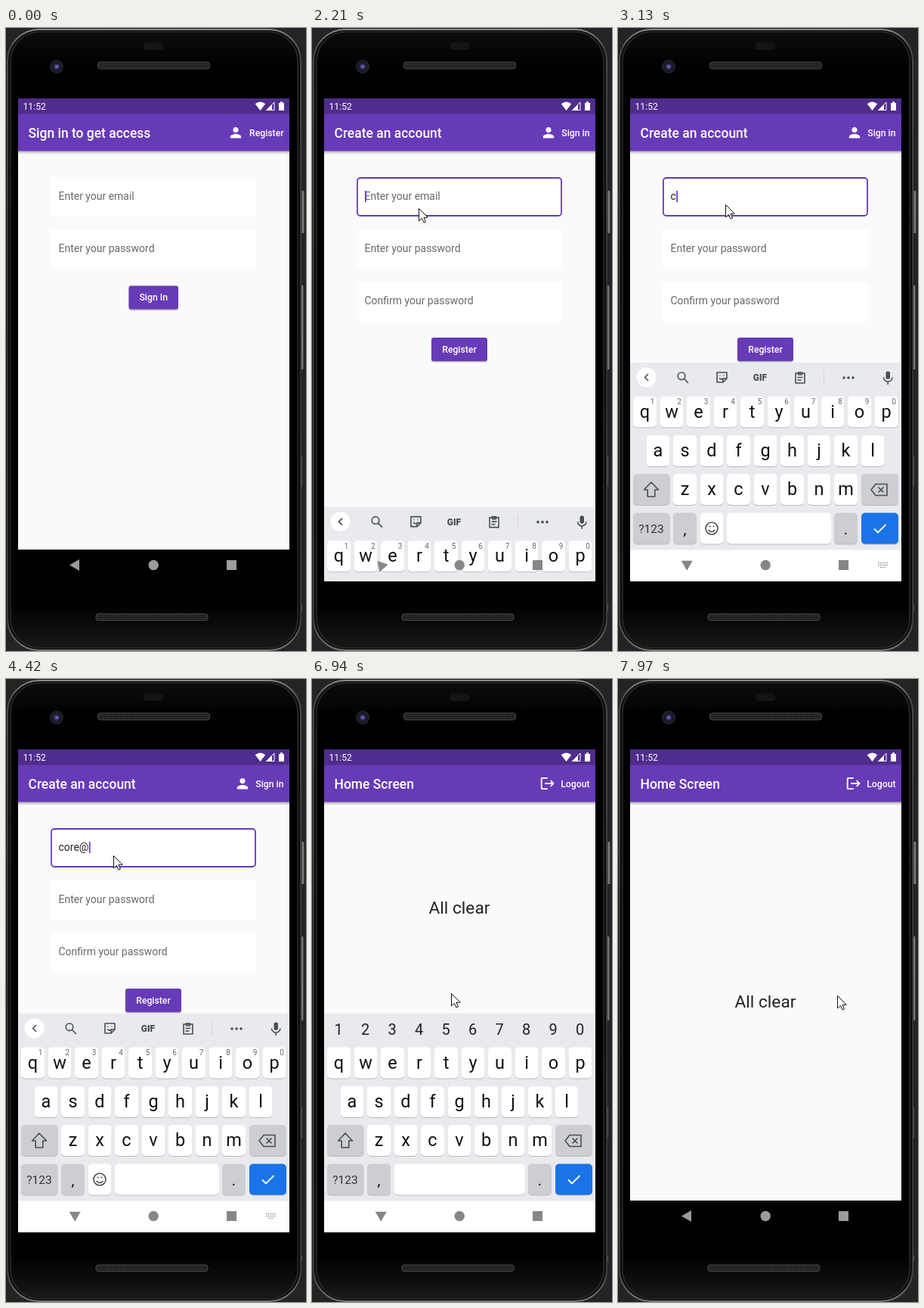
An HTML page for the animation above (8 s loop, 397x823 px).

```html
<!DOCTYPE html>
<html lang="en">
<head>
<meta charset="utf-8">
<title>Account sign-up</title>
<style>
html, body { margin: 0; width: 100%; height: 100%; overflow: hidden; background: #242426; }
svg { display: block; font-family: Roboto, sans-serif; }
text { white-space: pre; }
.bar { font-size: 17.47px; font-weight: 500; fill: #fff; }
.btn { font-size: 12.23px; font-weight: 500; fill: #fff; }
.hint { font-size: 13.98px; fill: #68686d; }
.val { font-size: 13.98px; fill: #222; }
.key { font-size: 23.5px; fill: #111; text-anchor: middle; }
.num { font-size: 20px; fill: #222; text-anchor: middle; }
.sup { font-size: 10px; fill: #666; text-anchor: middle; }
.ico { fill: none; stroke: #4b4e53; stroke-width: 1.6; stroke-linejoin: round; }
</style>
</head>
<body>
<svg id="stage" width="397" height="823" viewBox="0 0 397 823">
  <defs>
    <clipPath id="screen"><rect x="16" y="93" width="359" height="638"/></clipPath>
    <linearGradient id="edge" x1="0" y1="0" x2="0" y2="1">
      <stop offset="0" stop-color="#8a8a8a"/><stop offset=".03" stop-color="#4a4a4a"/>
      <stop offset=".5" stop-color="#303030"/><stop offset=".95" stop-color="#3c3c3c"/><stop offset="1" stop-color="#777"/>
    </linearGradient>
    <linearGradient id="glass" x1="0" y1="0" x2="0" y2="1">
      <stop offset="0" stop-color="#0c0c0c"/><stop offset=".06" stop-color="#000"/>
      <stop offset=".93" stop-color="#000"/><stop offset="1" stop-color="#191919"/>
    </linearGradient>
    <linearGradient id="side">
      <stop offset="0" stop-color="#222"/><stop offset=".6" stop-color="#8a8a8a"/><stop offset="1" stop-color="#333"/>
    </linearGradient>
    <linearGradient id="drop" x1="0" y1="0" x2="0" y2="1">
      <stop offset="0" stop-opacity=".32"/><stop offset="1" stop-opacity="0"/>
    </linearGradient>
    <radialGradient id="lens">
      <stop offset="0" stop-color="#8a86d8"/><stop offset=".3" stop-color="#35336b"/>
      <stop offset=".6" stop-color="#15151f"/><stop offset="1" stop-color="#26262c"/>
    </radialGradient>
    <pattern id="mesh" width="3" height="3" patternUnits="userSpaceOnUse">
      <rect width="3" height="3" fill="#2b2b2b"/><circle cx="1.5" cy="1.5" r=".9" fill="#141414"/>
    </pattern>
    <path id="person" d="M12 12c2.21 0 4-1.79 4-4s-1.79-4-4-4-4 1.79-4 4 1.79 4 4 4zm0 2c-2.67 0-8 1.34-8 4v2h16v-2c0-2.66-5.33-4-8-4z" fill="#fff"/>
  </defs>

  <!-- phone -->
  <rect width="397" height="823" fill="#242426"/>
  <rect x="390" y="215" width="5" height="56" rx="1.5" fill="url(#side)"/>
  <rect x="389" y="340" width="5" height="111" rx="1.5" fill="url(#side)"/>
  <path d="M391.5 565v41M391.5 762v8" stroke="#555"/>
  <path d="M0 64.500h4M0 73.500h4M0 225.500h4M0 233.500h4M386 64.500h5M386 73.500h5" stroke="#555"/>
  <rect x="2" y="2" width="388" height="820" rx="42" fill="#0b0b0b" stroke="url(#edge)" stroke-width="2"/>
  <rect x="6" y="5" width="380" height="814" rx="39" fill="url(#glass)" stroke="#2c2c2c" stroke-width="1.5"/>
  <rect x="182" y="19" width="26" height="10" rx="4" fill="#141414"/>
  <circle cx="67" cy="51" r="9" fill="url(#lens)"/>
  <rect x="121.500" y="45" width="148" height="9" rx="3" fill="url(#mesh)" stroke="#484848"/>
  <rect x="119" y="774" width="148" height="8.500" rx="3" fill="url(#mesh)" stroke="#484848"/>

  <g clip-path="url(#screen)">
    <rect x="16" y="93" width="359" height="638" fill="#000"/>
    <rect x="16" y="162" width="359" height="527" fill="#fafafa"/>
    <g id="form"></g>
    <text id="clear" x="154.500" font-size="22.7" fill="#222">All clear</text>
    <rect x="16" y="162" width="359" height="5" fill="url(#drop)"/>
    <rect x="16" y="93" width="359" height="21" fill="#4f2d8c"/>
    <rect x="16" y="113.500" width="359" height="49" fill="#673ab7"/>
    <text x="22.500" y="108" font-size="12.2" fill="#fff">11:52</text>
    <path d="M329.800 100.300Q336.500 94.500 343.200 100.300L336.500 109zM361 99h2v-1.800h3V99h2v10h-7z" fill="#fff"/>
    <path d="M344.500 108.500L355 98v10.500z" fill="none" stroke="#fff" stroke-width="1"/>
    <path d="M344 109L352 101v8z" fill="#fff"/>
    <text id="title" class="bar" x="29.500" y="144.800"></text>
    <text id="action" class="btn" x="367.500" y="142.700" text-anchor="end"></text>
    <use id="who" href="#person"/>
    <path id="exit" transform="translate(301 127.200) scale(.9)" fill="#fff" d="M17 7l-1.410 1.410L18.170 11H8v2h10.170l-2.580 2.580L17 17l5-5zM4 5h8V3H4c-1.100 0-2 .9-2 2v14c0 1.100.9 2 2 2h8v-2H4V5z"/>
    <g id="board"></g>
    <g id="nav">
      <path id="back" d="M84 709.500L97 702v15z"/>
      <circle cx="195.200" cy="709.500" r="6.700"/>
      <rect x="292" y="703" width="13" height="13"/>
      <path id="swap" d="M344 706.500h13M344 709.500h13M347 712.500h7" stroke="#999" stroke-width="1.700" stroke-dasharray="1.700 1.100"/>
    </g>
  </g>
  <path id="mouse" d="M0 0V16.500L3.900 12.900L6.500 18.600L9 17.500L6.500 12L11.800 11.700Z" fill="#fff" stroke="#111" stroke-width="1"/>
</svg>
<script>
const $ = id => document.getElementById(id);
const box = (x, y, w, h, r, fill, more = '') =>
  `<rect x="${x}" y="${y}" width="${w}" height="${h}" rx="${r}" fill="${fill}" ${more}/>`;
const label = (cls, x, y, s, more = '') => `<text class="${cls}" x="${x}" y="${y}" ${more}>${s}</text>`;
const show = (id, on) => { $(id).style.display = on ? '' : 'none'; };

// form
const button = (id, x, y, w, s) => `<g id="${id}">` +
  box(x, y + 2, w, 31, 3, '#000', 'opacity=".12"') + box(x, y + 1, w, 31, 3, '#000', 'opacity=".22"') +
  box(x, y, w, 31, 3, '#673ab7') + label('btn', x + w / 2, y + 19.7, s, 'text-anchor="middle"') + '</g>';

const field = (i, s) => {
  const y = 197 + i * 69;
  return `<g id="field${i}">` + box(59, y, 272, 52, 4, '#fff') +
    label('hint', 69.5, y + 30, s, `id="hint${i}"`) + label('val', 69.5, y + 30, '', `id="val${i}"`) + '</g>';
};

$('form').innerHTML = ['Enter your email', 'Enter your password', 'Confirm your password']
  .map((s, i) => field(i, s)).join('') +
  box(60, 198, 270, 50, 4, 'none', 'id="ring" stroke="#673ab7" stroke-width="1.8"') +
  box(70, 215, 1.7, 15, 0, '#673ab7', 'id="caret"') +
  button('signIn', 162.5, 340.5, 65.5, 'Sign In') + button('join', 158, 409, 74, 'Register');

// keyboard
const cap = (x, y, w, fill = '#fff') => box(x, y + 1, w, 41, 5, '#b9bbc0') + box(x, y, w, 41, 5, fill);
const grey = '#ccced4';
const row = (s, x0, y) => [...s].map((c, i) => {
  const x = x0 + i * 35.5;
  return cap(x - 15.5, y, 31) + label('key', x, y + 28, c);
}).join('');
const digits = [...'1234567890'];

$('board').innerHTML =
  box(16, 442, 359, 248, 0, '#e8eaed') + box(16, 689.5, 359, 400, 0, '#fff') +
  row('qwertyuiop', 35.5, 486.5) + row('asdfghjkl', 53, 538) + row('zxcvbnm', 88.5, 589) +
  cap(20, 589, 48.5, grey) + cap(322, 589, 49, grey) + cap(20, 640.5, 48.5, grey) +
  cap(73, 640.5, 31, grey) + cap(286, 640.5, 31, grey) + cap(322, 640.5, 49, '#1a73e8') +
  label('key', 88.5, 669, ',', 'style="font-size:20px"') + label('key', 301.5, 669, '.', 'style="font-size:20px"') +
  label('key', 44, 667, '?123', 'style="font-size:15.500px;fill:#333"') +
  `<path class="ico" d="M44 600L34.500 610h4.700v9h9.600v-9h4.700z"/>
   <path class="ico" d="M341 602.500h15v15h-15l-6-7.500zM344.500 606.500l7 7m0-7l-7 7"/>
   <path d="M339 661.500l5 5 10.500-10.500" fill="none" stroke="#fff" stroke-width="1.800"/>
   <g id="textKeys">${cap(108.5, 640.5, 31)}${cap(144, 640.5, 138)}
     <circle class="ico" cx="124" cy="661" r="8"/>
     <path class="ico" d="M119.500 663q4.500 5 9 0M120.500 658.500h2M125.500 658.500h2"/>
     ${digits.map((d, i) => label('sup', 45.5 + i * 35.5, 497, d)).join('')}
     <circle cx="37.500" cy="461.500" r="13" fill="#fff"/>
     <path id="chev" class="ico" d="M40 457l-4.500 4.500 4.500 4.500"/>
     <g id="tools">
       <path class="ico" d="M87.500 463.500l5.500 5.500"/><circle class="ico" cx="84" cy="459.800" r="4.800"/>
       <path class="ico" d="M131 455h13v8l-5 5h-8zM144 463h-5v5M134.500 459h1M139.500 459h1M134 462.500q3 3 5 .5"/>
       <text x="188" y="466" font-size="12" font-weight="900" fill="#4b4e53" text-anchor="middle">GIF</text>
       <path class="ico" d="M235 456h12v13h-12zM238.500 455h5v3h-5zM237.500 461.500h7M237.500 465h5"/>
       <path d="M272.500 453v18" stroke="#d3d5d9"/>
       <path d="M299 462h.01M305 462h.01M311 462h.01" stroke="#4b4e53" stroke-width="3.600" stroke-linecap="round"/>
     </g>
     <rect x="354.500" y="453.500" width="5.500" height="10.500" rx="2.700" fill="#4b4e53"/>
     <path class="ico" d="M351.500 461.500a5.700 5.700 0 0 0 11.400 0M357.200 467v4"/>
   </g>
   <g id="passKeys">${cap(108.5, 640.5, 173.5)}
     ${digits.map((d, i) => label('num', 35 + i * 35.5, 470, d)).join('')}</g>`;

// timing
const LOOP = 8000;
const REGISTER = 1700, EMAIL = 2130, PASS = 5010, CONFIRM = 6140, HOME = 6860;
const emailKeys = [3010, 3420, 3780, 4100, 4420, 4490, 4530, 4570, 4710, 4890, 4940];
const passKeys = [5550, 5850, 6040], confirmKeys = [6300, 6430, 6560];
const path = [
  [880, 233, 301], [1500, 340, 124], [1640, 338, 135], [1740, 338, 135], [2090, 141, 238], [2350, 141, 238],
  [2430, 142, 233], [5850, 142, 233], [6030, 160, 342], [6420, 160, 342], [6640, 177, 394],
  [6740, 184, 415], [7000, 184, 415], [7440, 271, 497], [7600, 271, 497], [7710, 271, 490],
  [7830, 271, 490], [7960, 290, 418], [LOOP, 290, 418]
];

const span = (t, a, b) => Math.min(1, Math.max(0, (t - a) / (b - a)));
const smooth = p => p * p * (3 - 2 * p);
const count = (times, t) => times.filter(k => t >= k).length;
const mask = (s, n, open) => open && n ? '•'.repeat(n - 1) + s[n - 1] : '•'.repeat(n);

function pointer(t) {
  const i = Math.max(1, path.findIndex(k => k[0] > t));
  const [a, x, y] = path[i - 1], [b, u, v] = path[i], p = smooth(span(t, a, b));
  return [x + (u - x) * p, y + (v - y) * p];
}

function caretOn(t) {
  return !(t >= 2730 && t < 3010 || t >= 5300 && t < 5550 || t >= 6040 && t < CONFIRM);
}

function draw(t) {
  const joining = t >= REGISTER, home = t >= HOME;
  $('title').textContent = home ? 'Home Screen' : joining ? 'Create an account' : 'Sign in to get access';
  $('action').textContent = home ? 'Logout' : joining ? 'Sign in' : 'Register';
  $('who').setAttribute('transform', `translate(${joining ? 302.2 : 293.2} 127.500) scale(.9)`);
  show('who', !home);
  show('exit', home);
  show('form', !home);
  show('clear', home);
  show('field2', joining);
  show('join', joining);
  show('signIn', !joining);

  const values = [
    'core@574.fn'.slice(0, count(emailKeys, t)),
    mask('fre', count(passKeys, t), t < CONFIRM),
    mask('fre', count(confirmKeys, t), true)
  ];
  values.forEach((s, i) => { $('val' + i).textContent = s; show('hint' + i, !s); });

  const focus = t >= CONFIRM ? 2 : t >= PASS ? 1 : t >= EMAIL ? 0 : -1;
  show('ring', focus >= 0);
  show('caret', focus >= 0 && caretOn(t));
  if (focus >= 0 && !home) {
    $('ring').setAttribute('y', 198 + focus * 69);
    $('caret').setAttribute('y', 215 + focus * 69);
    $('caret').setAttribute('x', 70 + (values[focus] ? $('val' + focus).getComputedTextLength() : 0));
  }

  // keyboard slides in, later out
  const rise = span(t, 2170, 2450), fall = smooth(span(t, 7000, 7290));
  const off = 290 * (Math.pow(1 - rise, 2.65) + fall);
  $('board').setAttribute('transform', `translate(0 ${off})`);
  show('board', off < 290);
  $('clear').setAttribute('y', 310 + (Math.min(690, 442 + off) - 442) / 2);
  const digitRow = t >= 5090;
  show('textKeys', !digitRow);
  show('passKeys', digitRow);

  // suggestion strip flips briefly while typing
  const flip = emailKeys.slice(0, 5).some(k => t >= k + 75 && t < k + 110);
  show('tools', !flip);
  $('chev').setAttribute('transform', flip ? 'rotate(180 37.500 461.500)' : '');

  const turn = 270 * smooth(span(t, 2130, 2430)) * (1 - smooth(span(t, 7020, 7300)));
  $('back').setAttribute('transform', `rotate(${turn} 91.200 709.500)`);
  $('nav').setAttribute('fill', off < 200 ? '#868686' : '#9c9c9c');
  $('swap').style.opacity = t < 6900 ? span(t, 2300, 2450) : 0;

  const [x, y] = pointer(t);
  $('mouse').setAttribute('transform', `translate(${x + .5} ${y + .5})`);
  show('mouse', t >= 880);
}

const start = performance.now();
function tick() {
  draw((performance.now() - start) % LOOP);
  requestAnimationFrame(tick);
}
tick();
</script>
</body>
</html>
```
